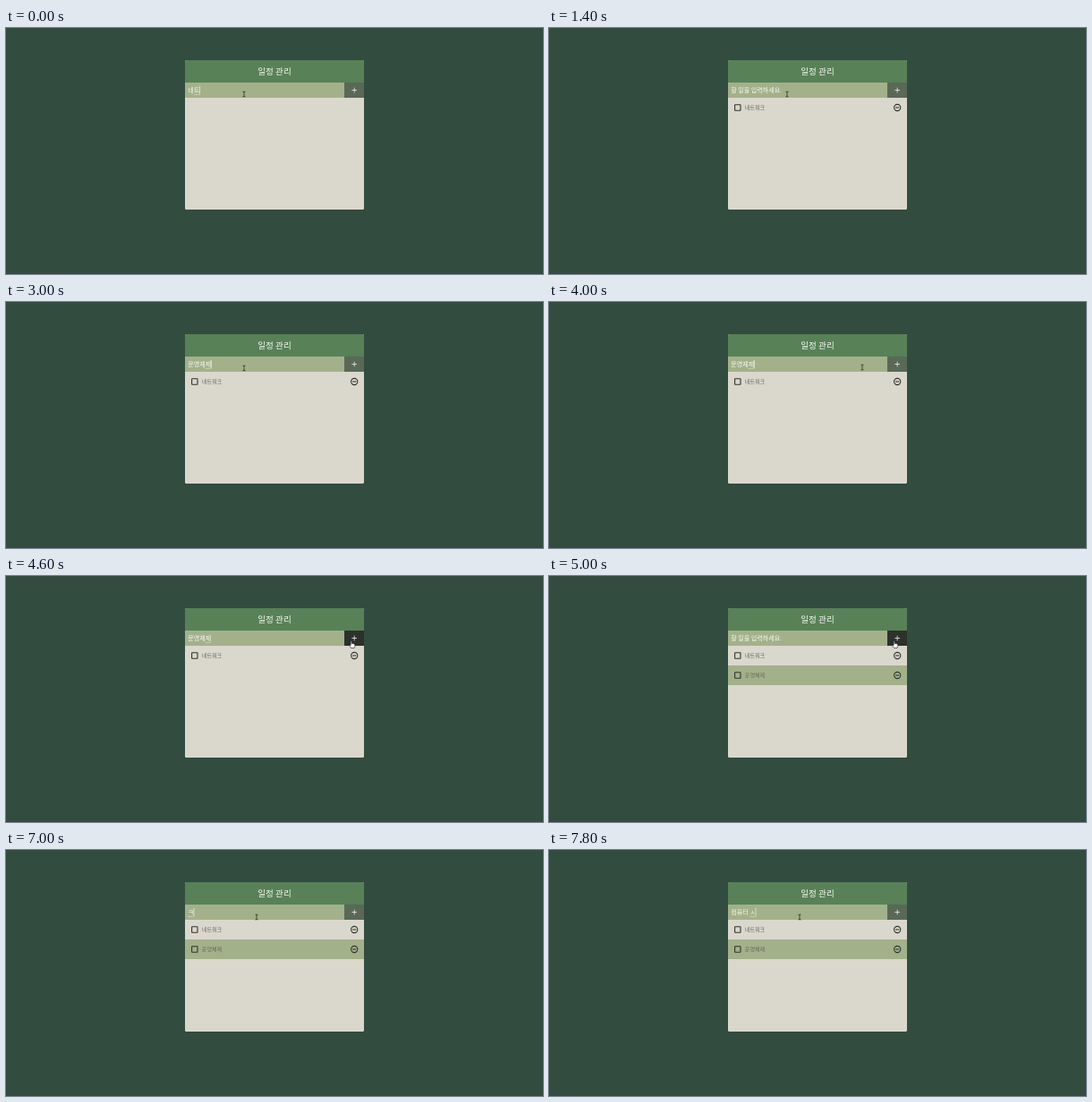
Animation of 600x275 px, one loop 8 s. Source, as an HTML page:

```html
<!DOCTYPE html>
<html>
<head>
<meta charset="utf-8">
<style>
  html, body { margin: 0; width: 100%; height: 100%; overflow: hidden; background: #324c3f; }
  svg { display: block; width: 600px; height: 275px; }
  text { font-family: "Noto Sans CJK KR", "Noto Sans CJK", sans-serif; fill: #f8f8f4; font-size: 7.05px; white-space: pre; }
  .title { font-size: 9.6px; }
  .item text { font-size: 6.1px; fill: #66675c; }
  .icon { fill: none; stroke: #30332e; stroke-width: 1.1; }
</style>
</head>
<body>
<svg viewBox="0 0 600 275">
  <defs>
    <g id="icons" class="icon">
      <rect x="207.6" y="7.8" width="6.4" height="6.4" rx=".4"/>
      <circle cx="389.2" cy="11" r="3.6"/>
      <path d="M387.2 11h4"/>
    </g>
    <clipPath id="round"><rect x="200" y="36" width="200" height="167" rx="1.6"/></clipPath>
  </defs>
  <g clip-path="url(#round)">
    <path fill="#dad7cd" d="M200 36h200v167h-200z"/>
    <path fill="#588157" d="M200 36h200v25h-200z"/>
    <path fill="#a3b18a" d="M200 61h178v17h-178z"/>
    <path id="button" d="M378 61h22v17h-22z"/>
  </g>
  <path d="M386.4 69.5h5.6M389.2 66.7v5.6" stroke="#eeeeea" stroke-width=".8"/>
  <text class="title" x="300" y="52.4" text-anchor="middle">일정 관리</text>

  <g class="item" id="first" transform="translate(0 78)">
    <use href="#icons"/><text x="218.8" y="13.2">네트워크</text>
  </g>
  <g class="item" id="second" transform="translate(0 100)">
    <path fill="#a3b18a" d="M200 0h200v22h-200z"/>
    <use href="#icons"/><text x="218.8" y="13.2">운영체제</text>
  </g>

  <text id="entry" x="203.2" y="72"></text>
  <path id="underline" stroke="#e4e8da" stroke-width=".5"/>
  <path id="caret" stroke="#eef0e6" stroke-width=".7"/>

  <path id="beam" fill="none" stroke="#252822" stroke-width=".8" d="M-1.5-3Q0-3 0-2Q0-3 1.5-3M0-2V2M-1.5 3Q0 3 0 2Q0 3 1.5 3"/>
  <path id="hand" fill="#fff" stroke="#151515" stroke-width=".6" stroke-linejoin="round"
    d="M-1.4-3.6Q-.8-4.3-.2-3.6V-1Q.6-1.5 1.1-.8Q1.9-1.2 2.3-.4Q3.2-.6 3.3.4V2L2.5 4H-1L-3 1.2Q-3.2.2-2.3.5L-1.4 1.3Z"/>
</svg>
<script>
const LOOP = 8000, STEP = 200, LEFT = 203.2;
const HINT = "할 일을 입력하세요.";
const el = id => document.getElementById(id);
const show = (node, on) => node.setAttribute("visibility", on ? "visible" : "hidden");

// each entry: [start time, value]
const typing = [
  [0, "네트"], [200, "네트워"], [400, "네트웤"], [600, "네트워크"], [800, ""],
  [2000, "우"], [2200, "운ㅇ"], [2400, "운영"], [2600, "운영ㅊ"], [2800, "운영체"], [3000, "운영체제"],
  [5000, ""],
  [7000, "ㅋ"], [7200, "컴"], [7400, "컴퓨"], [7600, "컴퓨터"], [7800, "컴퓨터 ㅅ"]
];
const caretOn = [
  [0, true], [1200, false], [2000, true], [3600, false], [4000, true],
  [4400, false], [5600, true], [6200, false], [6600, true]
];
const pointer = [
  [0, [266, 74]], [3600, [270, 74]], [3800, [302, 73]], [4000, [350, 73]],
  [4200, [382, 75]], [4400, [385, 76]], [4600, [386.5, 76.5]],
  [5200, [358, 75]], [5400, [300, 75]], [5600, [280, 75]]
];
const at = (track, t) => track.findLast(([start]) => start <= t)[1];

function draw(now) {
  const t = Math.floor(now % LOOP / STEP) * STEP;
  const typed = at(typing, t), entry = el("entry");
  entry.textContent = typed || HINT;
  const end = typed ? LEFT + entry.getComputedTextLength() : LEFT - .2;

  show(el("underline"), typed);
  if (typed) {
    const last = entry.getSubStringLength(typed.length - 1, 1);
    el("underline").setAttribute("d", `M${end - last} 74.4H${end}`);
  }
  show(el("caret"), at(caretOn, t));
  el("caret").setAttribute("d", `M${end + .3} 64.8V74.2`);

  show(el("first"), t >= 800);
  show(el("second"), t >= 5000);

  const [x, y] = at(pointer, t), hover = x > 378;
  el("button").setAttribute("fill", hover ? "#2d312d" : "#596857");
  for (const id of ["beam", "hand"]) {
    el(id).setAttribute("transform", `translate(${x} ${y})`);
    show(el(id), hover === (id === "hand"));
  }
}

const begin = performance.now();
function tick() {
  draw(performance.now() - begin);
  requestAnimationFrame(tick);
}
tick();
</script>
</body>
</html>
```
